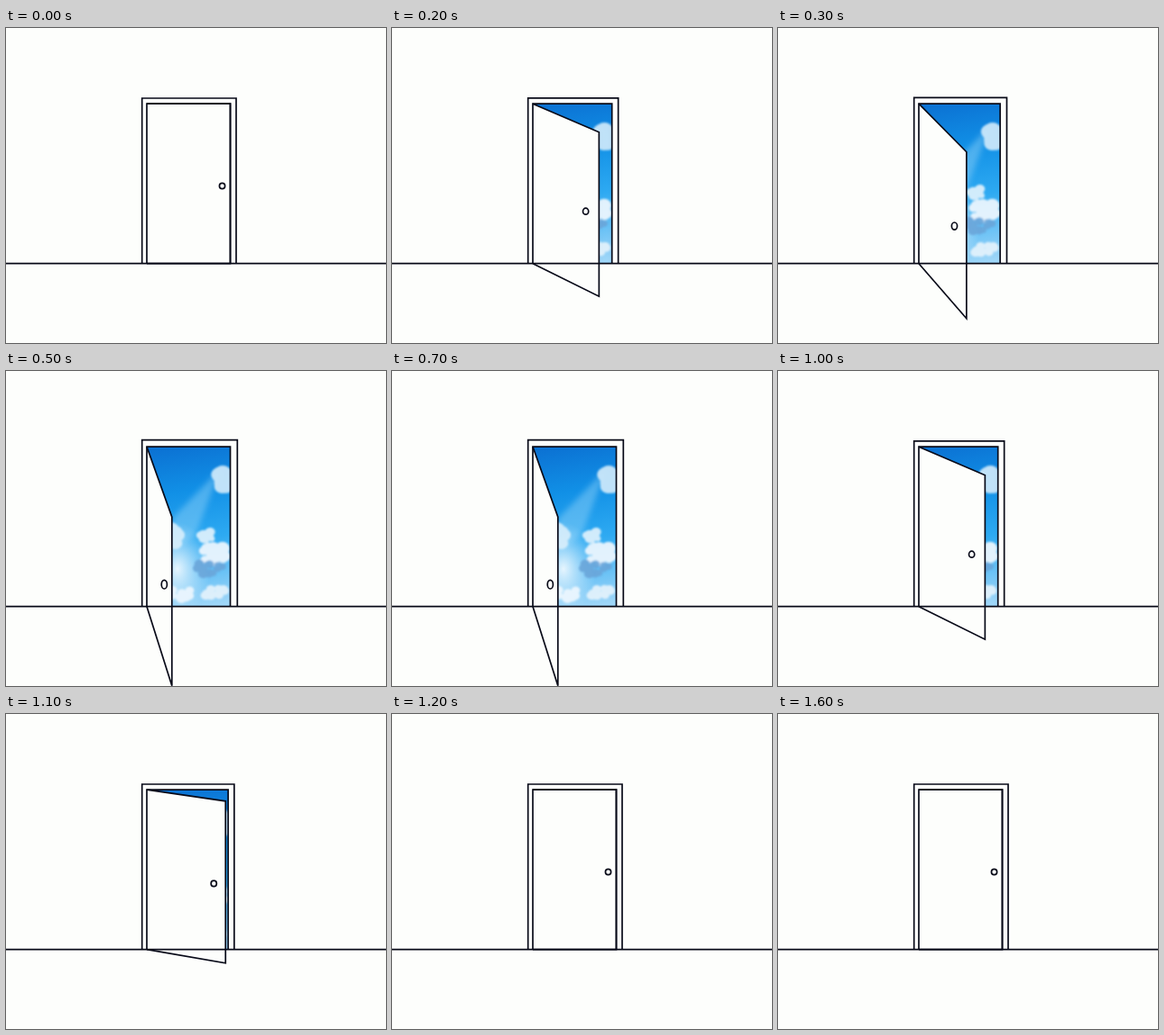
These frames come from a looping animation (421x350 px, 1.7 s). An HTML page:

```html
<!DOCTYPE html>
<html lang="en">
<head>
<meta charset="utf-8">
<title>Door to the sky</title>
<style>
  html, body { margin: 0; width: 100%; height: 100%; overflow: hidden; background: #fdfefc; }
  svg { display: block; width: 421px; height: 350px; }
  .line { fill: none; stroke: #080a18; stroke-width: 1.7; }
  #leaf { fill: #fdfefc; }
</style>
</head>
<body>
<svg viewBox="0 0 421 350">
  <defs>
    <linearGradient id="air" x1="0.3" y1="0" x2="0.4" y2="1">
      <stop offset="0" stop-color="#0b70d2"/>
      <stop offset="0.3" stop-color="#1190e6"/>
      <stop offset="0.6" stop-color="#2eaaf2"/>
      <stop offset="1" stop-color="#9ed6f8"/>
    </linearGradient>
    <radialGradient id="glow">
      <stop offset="0" stop-color="#e6f5fe"/>
      <stop offset="1" stop-color="#c4e8fc" stop-opacity="0"/>
    </radialGradient>
    <filter id="soft" x="-20%" y="-20%" width="140%" height="140%"><feGaussianBlur stdDeviation="1.1"/></filter>
    <filter id="haze" x="-30%" y="-30%" width="160%" height="160%"><feGaussianBlur stdDeviation="3"/></filter>
    <clipPath id="opening"><rect id="hole" x="156" y="84" height="178"/></clipPath>
  </defs>
  <g clip-path="url(#opening)">
    <g id="sky">
      <rect x="150" y="80" width="110" height="186" fill="url(#air)"/>
      <path d="M238 108L184 164V200L210 182Z" fill="#a4dcfa" opacity=".4" filter="url(#haze)"/>
      <ellipse cx="190" cy="220" rx="36" ry="52" fill="url(#glow)"/>
      <g id="clouds" filter="url(#soft)"></g>
    </g>
  </g>
  <path id="leaf"/>
  <path id="frame" class="line"/>
  <path class="line" d="M0 261.7H421"/>
  <path id="edge" class="line"/>
  <ellipse id="knob" class="line"/>
</svg>
<script>
  const $ = id => document.getElementById(id);
  const set = (id, attrs) => Object.entries(attrs).forEach(([k, v]) => $(id).setAttribute(k, v));
  const FLOOR = 261.7, HINGE = 156, LINTEL = 84.2, WIDTH = 92.5;
  const STEP = 100, LOOP = 1700, OPEN = 4, SHUT_AT = 12;

  let seed = 7;
  const random = () => (seed = seed * 16807 % 2147483647) / 2147483647;

  // A cloud is a scatter of puffs inside an ellipse
  function cloud(x, y, w, h, fill) {
    const count = 8 + w / 3;
    let puffs = '';
    for (let i = 0; i < count; i++) {
      const a = random() * 2 * Math.PI, d = Math.sqrt(random()) * 0.75;
      const r = h * (0.3 + 0.25 * random());
      puffs += `<ellipse cx="${x + w * d * Math.cos(a)}" cy="${y + h * d * Math.sin(a)}" rx="${r * 1.15}" ry="${r}"/>`;
    }
    return `<g fill="${fill}" opacity=".9">${puffs}</g>`;
  }
  $('clouds').innerHTML =
    cloud(242, 120, 9, 15, '#d3ebfb') +
    cloud(187, 180, 8, 16, '#d9effc') +
    cloud(221, 183, 10, 9, '#e4f3fd') +
    cloud(230, 203, 19, 13, '#f3f9fe') +
    cloud(225, 219, 23, 9, '#6aa6da') +
    cloud(193, 247, 17, 9, '#eff8fe') +
    cloud(232, 247, 17, 9, '#e6f3fc');

  const jamb = (left, top, right) => `M${left} ${FLOOR}V${top}H${right}V${FLOOR}`;

  // u runs from 0 (shut) to 1 (wide open)
  function show(u) {
    const angle = 72.5 * Math.PI / 180 * u ** 0.95;
    const span = WIDTH * Math.cos(angle);
    const drop = 88 * u ** 1.27;
    const squeeze = Math.sin(Math.PI * u) ** 2;
    const inner = HINGE + WIDTH - 4.8 * squeeze;
    const outer = 255 + 1.3 * u - 5 * squeeze;
    const d = `M${HINGE} ${LINTEL}L${HINGE + span} ${LINTEL + drop - 10 * u}V${FLOOR + drop}L${HINGE} ${FLOOR}`;

    set('leaf', { d });
    set('edge', { d });
    set('frame', { d: jamb(150.7, 78 - 1.4 * u ** 3, outer) + jamb(HINGE, LINTEL, inner) });
    set('hole', { width: inner - HINGE });
    set('sky', { transform: `translate(${-4.8 * squeeze} 0)` });
    set('knob', {
      cx: HINGE + span * (0.903 - 0.208 * u),
      cy: 175.5 + 61.7 * u ** 1.13,
      rx: 3.1,
      ry: 3.1 + 1.7 * u * u
    });
  }

  function tick() {
    const i = Math.floor(performance.now() % LOOP / STEP);
    show(Math.max(0, Math.min(i, SHUT_AT - i, OPEN)) / OPEN);
    requestAnimationFrame(tick);
  }
  tick();
</script>
</body>
</html>
```
